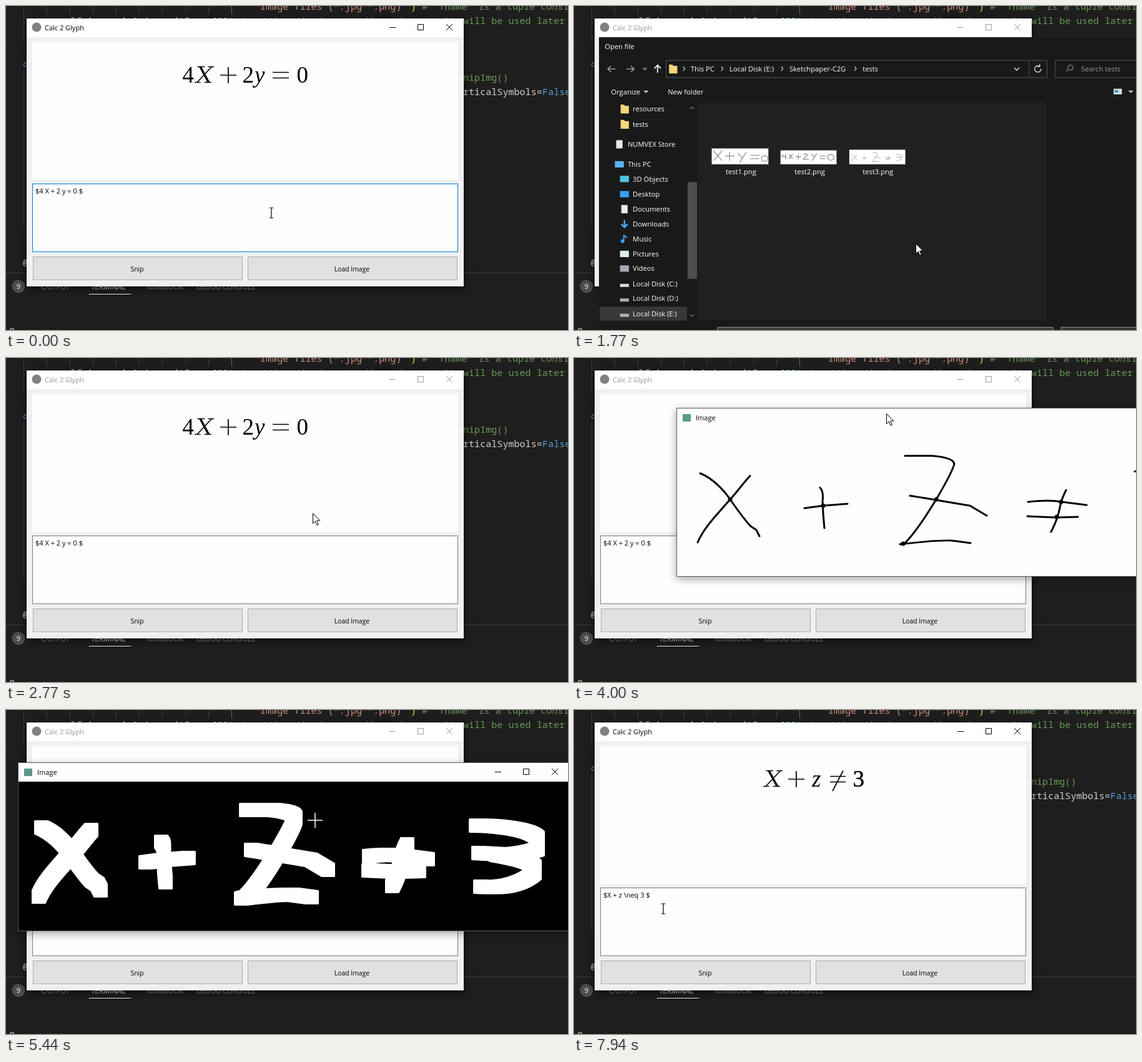
An HTML page that plays this animation: 900 by 520 pixels, repeating every 8000 ms.

```html
<!DOCTYPE html>
<html lang="en">
<head>
<meta charset="utf-8">
<title>Handwriting to formula</title>
<style>
html, body { margin: 0; width: 100%; height: 100%; overflow: hidden; background: #1e1e1e; }
svg { display: block; width: 900px; height: 520px; font-family: "Open Sans", "Noto Sans", sans-serif; }
text { white-space: pre; }
.code { font: 15.1px "Noto Sans Mono", "DejaVu Sans Mono", monospace; }
.serif { font-family: "Liberation Serif", serif; }
.it { font-style: italic; }
#main { filter: drop-shadow(0 3px 7px rgba(0,0,0,.6)); }
#image { filter: drop-shadow(0 4px 7px rgba(0,0,0,.35)); }
</style>
</head>
<body>
<svg id="stage" viewBox="0 0 900 520"></svg>
<script>
const LOOP = 8000;
const rect = (x, y, w, h, fill, stroke = 'none', id = '') =>
  `<rect id="${id}" x="${x}" y="${y}" width="${w}" height="${h}" fill="${fill}" stroke="${stroke}"/>`;
const text = (x, y, s, fill = '#000', size = 11, attr = '') =>
  `<text x="${x}" y="${y}" fill="${fill}" font-size="${size}" ${attr}>${s}</text>`;
const mid = 'text-anchor="middle"';
const line = (d, stroke = '#000', w = 1, attr = '') =>
  `<path d="${d}" fill="none" stroke="${stroke}" stroke-width="${w}" ${attr}/>`;
const group = (id, body, attr = '') => `<g id="${id}" ${attr}>${body}</g>`;
const code = (x, y, s, fill) => `<text class="code" x="${x}" y="${y}" fill="${fill}">${s}</text>`;
// minimise, maximise and close, centred on the maximise button
const caption = (x, y) =>
  `M${x - 50} ${y + .5}h10M${x - 4.5} ${y - 4.5}h9v9h-9zM${x + 41} ${y - 5}l10 10m0 -10l-10 10`;

function editor() {
  let s = rect(0, 0, 900, 520, '#1e1e1e');
  for (let x = 65.5; x < 370; x += 37) s += line(`M${x} 0V13`, x > 350 ? '#707070' : '#404040');
  s += line('M28.5 0V56M28.5 103V355', '#404040') + line('M0 56.5H900', '#282828');
  s += code(407, 6, "Image files (*.jpg *.png)'", '#ce9178') + code(648, 6, ')', '#ffd700');
  s += code(666, 6, "# 'fname' is a tuple consists", '#6a9955');
  s += code(85, 29, 'self.img = io2.imread(fname[0])', '#9cdcfe');
  s += code(375, 29, '# setting the img attribute in case it', '#6a9955');
  s += code(732, 29, 'will be used later', '#6a9955');
  s += code(27, 98, 'd', '#569cd6') + code(732, 120, 'nipImg()', '#6a9955');
  s += code(732, 143, 'rticalSymbols=', '#d4d4d4') + code(859, 143, 'False', '#569cd6');
  s += code(27, 417, '@', '#d4d4d4') + line('M0 428.5H900', '#424242');
  s += '<circle cx="20" cy="450" r="10.5" fill="#4d4d4d"/>' + text(20, 454, '9', '#fff', 11, mid);
  [[57, 'OUTPUT'], [136, 'TERMINAL'], [225, 'NUMBOOK'], [305, 'DEBUG CONSOLE']].forEach(([x, t]) =>
    s += text(x, 455, t, t === 'TERMINAL' ? '#e7e7e7' : '#989898', 11.5));
  return s + line('M133 462.5H200', '#e7e7e7') + code(5, 527, '9', '#d4d4d4');
}

// Typeset pieces
const bigX = dx => `<g transform="translate(${dx})">` + line('M311 98.5L324.5 123.5', '#000', 3.6) +
  line('M329.5 98.5L306 123.5', '#000', 1.6) +
  line('M306.5 98.5H318M323.5 98.5H333M302 123.5H311.5M317.5 123.5H329', '#000', 1.5) + '</g>';
const glyph = (x, s, cls = '') => text(x, 124, s, '#000', 37, `class="serif ${cls}"`);
const plus = 'M343 112H369M356 99V125';
const raised = 'transform="translate(0 -1)"';

function mainWindow() {
  let s = rect(33, 20, 700, 430, '#f0f0f2') + rect(33, 20, 700, 30, '#fff');
  s += '<circle cx="49" cy="34" r="7.5" fill="#808080"/>';
  s += group('bar', text(62, 39, 'Calc 2 Glyph', 'currentColor') + line(caption(664, 34), 'currentColor'));
  s += rect(42, 58, 682, 221, '#fefefe');
  s += group('oldMath', glyph(282.5, '4') + bigX(0) + line(plus, '#000', 1.7) + glyph(378.5, '2') +
    glyph(398, 'y', 'it') + line('M427 107.5H453M427 116.5H453', '#000', 1.7) + glyph(465.5, '0'), raised);
  s += group('newMath', bigX(1) + line(plus, '#000', 1.7) + glyph(381, 'z', 'it') +
    line('M410 107.5H435M410 116.5H435M431 98.5L414 131', '#000', 1.7) +
    text(446.5, 124, '3', '#000', 37, 'class="serif" stroke="#000" stroke-width=".5"'), raised);
  s += group('raw', text(50, 102, 'X + z \\neq 3', '#888', 37, 'class="serif"'));
  s += group('busy', rect(43.5, 256.5, 138, 20, '#e6e6e6', '#999') +
    text(52, 270, 'Processing math: 100%', '#000', 12.8, 'class="serif"'));
  s += rect(42.5, 285.5, 681, 109, '#fefefe', '#7a7a7a', 'box');
  s += group('oldTex', text(47, 301, '$4 X + 2 y = 0 $')) + group('newTex', text(47, 301, '$X + z \\neq 3 $'));
  s += rect(43.5, 402.5, 335, 37, '#e1e1e1', '#adadad') + text(210, 426, 'Snip', '#000', 10.4, mid);
  s += rect(387.5, 402.5, 335, 37, '#e1e1e1', '#adadad', 'load') + text(554, 426, 'Load Image', '#000', 10.4, mid);
  return s;
}

// Handwriting, drawn thin on white and dilated on black
const strokes = 'M202 185C222 193 240 212 250 227C262 244 275 262 283 270L292 276L297 286' +
  'M282 189C270 202 262 214 250 227C230 250 208 272 198 296' +
  'M369 241L399 237L438 234M394 208Q400 214 398 230L399 250L401 273' +
  'M530 157H574Q608 160 609 170C606 182 590 210 580 227C560 260 545 282 530 297L522 299Q580 292 605 293L635 297' +
  'M538 221Q570 226 586 229L634 237L661 253' +
  'M727 231Q760 227 782 231L821 236M726 254L772 256L807 255M788 212Q780 228 778 240Q775 258 764 279' +
  'M898 182C930 182 985 187 997 202V220C960 232 935 228 902 226M930 229Q985 238 992 248V258Q960 285 905 280';
const ink = (color, attr = '') => line(strokes, color, 3, 'stroke-linecap="round" stroke-linejoin="round" ' + attr);
const dots = [[250, 227], [399, 237], [580, 227], [780, 231], [773, 255], [527, 298]]
  .map(([x, y]) => `<circle cx="${x}" cy="${y}" r="3.5"/>`).join('');

function imageWindow() {
  return rect(164.5, 80.5, 883, 270, '#fefefe', '#5a5a5a') + rect(174, 90, 13, 12, '#5b9a8b') +
    text(195, 100, 'Image') + line(caption(978, 95)) +
    group('thin', ink('#000') + dots) +
    group('thick', rect(165, 111, 882, 239, '#000') +
      `<g transform="translate(-.5 -.5)">${ink('#fff', 'filter="url(#dilate)"')}</g>`);
}

const folder = (x, y) =>
  `<path d="M${x} ${y - 7}h5l2 2h6v12h-13z" fill="#f5d67b"/>`;

function sidebar() {
  const rows = [['resources', 168], ['tests', 192], ['NUMVEX Store', 223, '#e8e8e8'], ['This PC', 255, '#5db5f0'],
    ['3D Objects', 278, '#4fc3dc'], ['Desktop', 302, '#3a9ff0'], ['Documents', 325, '#e4eef5'],
    ['Downloads', 349, '#4aa8ee', 'v'], ['Music', 372, '#3a9ff0', 'n'], ['Pictures', 396, '#dcebf2'],
    ['Videos', 419, '#a8a8b4'], ['Local Disk (C:)', 443, '#d0dce4'], ['Local Disk (D:)', 466, '#b0b0b0'],
    ['Local Disk (E:)', 490, '#b0b0b0']];
  return rect(50, 479, 137, 22, '#383838') + rows.map(([name, y, color, shape]) => {
    const x = /NUM|This/.test(name) ? 74 : 82;
    const icon = !color ? folder(x + 1, y)
      : shape === 'v' ? line(`M${x + 7} ${y - 6}v11m-5 -5l5 5l5 -5`, color, 2.5)
      : shape === 'n' ? line(`M${x + 6} ${y + 5}v-11q1 3 5 4`, color, 2) + `<circle cx="${x + 4}" cy="${y + 4}" r="3" fill="${color}"/>`
      : /Disk/.test(name) ? rect(x, y, 14, 5, color)
      : /Doc|NUM/.test(name) ? rect(x + 2, y - 6, 10, 13, color) : rect(x, y - 5, 14, 10, color);
    return icon + text(x + 20, y + 4, name, '#fff');
  }).join('');
}

function files() {
  const pen = 'stroke-linecap="round"';
  const zero = (x, y) => `<ellipse cx="${x}" cy="${y}" rx="5" ry="4.5" fill="none" stroke="#777"/>`;
  return group('pick', rect(436.5, 163.5, 101, 112, '#777', '#808080')) +
    rect(226, 230, 89, 25, '#fff') + rect(334, 233, 88, 22, '#fff') + rect(442, 232, 88, 23, '#fff') +
    line('M229 234l13 15M242 234l-13 15M247 242h15M254 236v13M268 238l6 7M280 236l-10 16M287 241h14M287 246h13', '#777', 1, pen) +
    zero(309, 246) +
    line('M338 239l-1 4h6m-1 -4v8M347 239l6 7m0 -7l-6 7M358 243h8M362 239v8M370 240q6 -4 6 1l-6 6h8M383 239l4 4M391 238l-7 11M396 242h8M396 246h8', '#777', 1, pen) +
    zero(413, 244) +
    `<g transform="translate(425.5 221) scale(.1)">${line(strokes, '#aaa', 9)}</g>` +
    [272, 380, 487].map((x, i) => text(x, 271, `test${i + 1}.png`, '#fff', 11, mid)).join('');
}

function dialog() {
  const gray = '#9a9a9a', chev = x => `M${x} 101l3 3.5l-3 3.5`;
  const blank = rect(50, 86, 900, 414, '#fff') + rect(50, 157, 154, 343, '#191919') +
    rect(179, 514, 52, 25, '#fff') + rect(235, 510, 526, 25, '#fff') + rect(773, 510, 170, 25, '#fff') +
    text(79, 75, 'Open file', '#fff');
  const full = rect(205, 158, 545, 342, '#202020') + line('M750.5 160V500', '#2f2f2f') + text(58, 74, 'Open file', '#fff') +
    line('M75 105H63l5 -5m-5 5l5 5M92 105h12l-5 -5m5 5l-5 5M118 103l3 3l3 -3', gray, 1.5) +
    line('M141 111V99l-5 5m5 -5l5 5', '#fff', 1.7) +
    rect(154.5, 91.5, 598, 27, '#191919', '#535353') + line('M724.5 92V118', '#535353') + folder(159, 105) +
    line(chev(181) + chev(241) + chev(335) + chev(450), '#ddd') +
    text(193, 109, 'This PC', '#fff') + text(254, 109, 'Local Disk (E:)', '#fff') +
    text(348, 109, 'Sketchpaper-C2G', '#fff') + text(463, 109, 'tests', '#fff') +
    line('M701 103l4 4l4 -4', '#ddd', 1.4) + line('M741 101a5 5 0 1 0 2 4m-2 -8v4h-4', '#ddd', 1.3) +
    rect(765.5, 91.5, 180, 27, '#191919', '#535353') + line('M783 109l3 -4a4 4 0 1 1 1 1', gray) +
    text(806, 109, 'Search tests', gray) + text(68, 145, 'Organize', '#fff') + text(157, 145, 'New folder', '#fff') +
    `<path d="M119 139h8l-4 4zM880 139h8l-4 4z" fill="#ccc"/>` +
    rect(857, 136, 13, 9, '#cfdde6') + rect(859, 138, 5, 4, '#4a90c0') + sidebar() + files() +
    text(178, 526, 'File name:', '#fff') + rect(235.5, 511.5, 526, 24, '#383838', '#999') + text(240, 528, 'test3.png', '#fff') +
    rect(774.5, 511.5, 168, 24, '#333', '#999') + text(779, 528, 'Image files (*.jpg *.png)', '#fff');
  return rect(49, 55, 901, 491, '#191919') +
    group('blank', blank) + group('full', full) + rect(188, 283, 15, 152, '#4d4d4d') +
    line('M192 168l3.5 -3.5l3.5 3.5M192 491l3.5 3.5l3.5 -3.5', '#777', 1.2);
}

const stage = document.getElementById('stage');
stage.innerHTML =
  `<filter id="dilate" filterUnits="userSpaceOnUse" x="165" y="111" width="883" height="240">
   <feMorphology operator="dilate" radius="10"/></filter>` +
  editor() + group('main', mainWindow()) + group('dialog', dialog()) + group('image', imageWindow()) +
  group('arrow', '<path d="M.5 .5V16.5L4.2 13L7 19.3L9.3 18.2L6.6 12H11.8Z" fill="#fff" stroke="#000"/>') +
  group('beam', line('M-3 -8h2.5l.5 .5l.5 -.5h2.5M0 -8V8M-3 8h6', '#000', 1.2)) +
  group('cross', line('M-12 0H12M0 -12V12', 'currentColor', 1.6));

const $ = id => document.getElementById(id);
const set = (id, attrs) => { for (const k in attrs) $(id).setAttribute(k, attrs[k]); };
const show = (id, on) => { $(id).style.display = on ? '' : 'none'; };
const clamp = (v, a = 0, b = 1) => Math.min(b, Math.max(a, v));

// Pointer stops: time, x, y
const stops = [[50, 425, 332], [830, 545, 425], [880, 545, 425], [1200, 561, 414], [1600, 561, 414],
  [2200, 491, 249], [3110, 491, 249], [3880, 500, 89], [4020, 500, 89], [4500, 355, 93], [4540, 355, 93],
  [4740, 445, 142], [4770, 445, 142], [4940, 495, 177], [7270, 495, 177], [7900, 143, 319]];

function pointer(t) {
  const i = stops.findIndex(s => s[0] > t);
  if (i < 1) return stops[i ? stops.length - 1 : 0].slice(1);
  const [t0, x0, y0] = stops[i - 1], [t1, x1, y1] = stops[i];
  const u = (t - t0) / (t1 - t0), e = u * u * (3 - 2 * u);
  return [x0 + (x1 - x0) * e, y0 + (y1 - y0) * e];
}

function draw(t) {
  const [x, y] = pointer(t);
  const [dx, dy] = pointer(clamp(t, 4020, 4500)).map((v, i) => v - [500, 89][i]);
  const done = t >= 6000, dark = t >= 5160;

  $('bar').style.color = t < 1430 || done ? '#000' : '#999';
  show('oldMath', !done);
  show('oldTex', !done);
  show('newTex', done);
  show('raw', t >= 6440 && t < 6830);
  show('newMath', t >= 6830);
  show('busy', t >= 6550 && t < 7110);
  set('busy', { opacity: clamp((7110 - t) / 220) });
  set('box', { stroke: t < 1270 ? '#0078d7' : '#7a7a7a' });
  const hover = t < 1700 && x > 387 && x < 723 && y > 402 && y < 440;
  set('load', { fill: hover ? '#e5f1fb' : '#e1e1e1', stroke: hover ? '#0078d7' : '#adadad' });

  const opening = t < 2300;
  const a = t < 1440 ? 0 : opening ? clamp((t - 1390) / 208) : clamp(1 - (t - 2460) / 200);
  const low = opening ? .97 : .9755, k = low + (1.02 - low) * a;
  show('dialog', a > 0);
  set('dialog', { opacity: a, transform: `translate(500 300) scale(${k}) translate(-500 -300)` });
  show('blank', t < 1610);
  show('full', t >= 1610);
  show('pick', x < 538 && y < 275);

  const b = clamp((t - 2850) / 180) * clamp((5830 - t) / 150), z = .95 + .05 * b;
  show('image', b > 0);
  set('image', { opacity: b, transform: `translate(${606 + dx} ${216 + dy}) scale(${z}) translate(-606 -216)` });
  show('thin', !dark);
  show('thick', dark);

  const kind = b > 0 && y > 111 + dy ? 'cross'
    : !a && !b && x > 42 && x < 724 && y > 285 && y < 395 ? 'beam' : 'arrow';
  for (const id of ['arrow', 'beam', 'cross']) show(id, id === kind);
  set(kind, { transform: `translate(${Math.round(x)} ${Math.round(y)})` });
  $('cross').style.color = dark ? '#fff' : '#000';
}

const start = performance.now();
function tick() {
  draw((performance.now() - start) % LOOP);
  requestAnimationFrame(tick);
}
tick();
</script>
</body>
</html>
```
